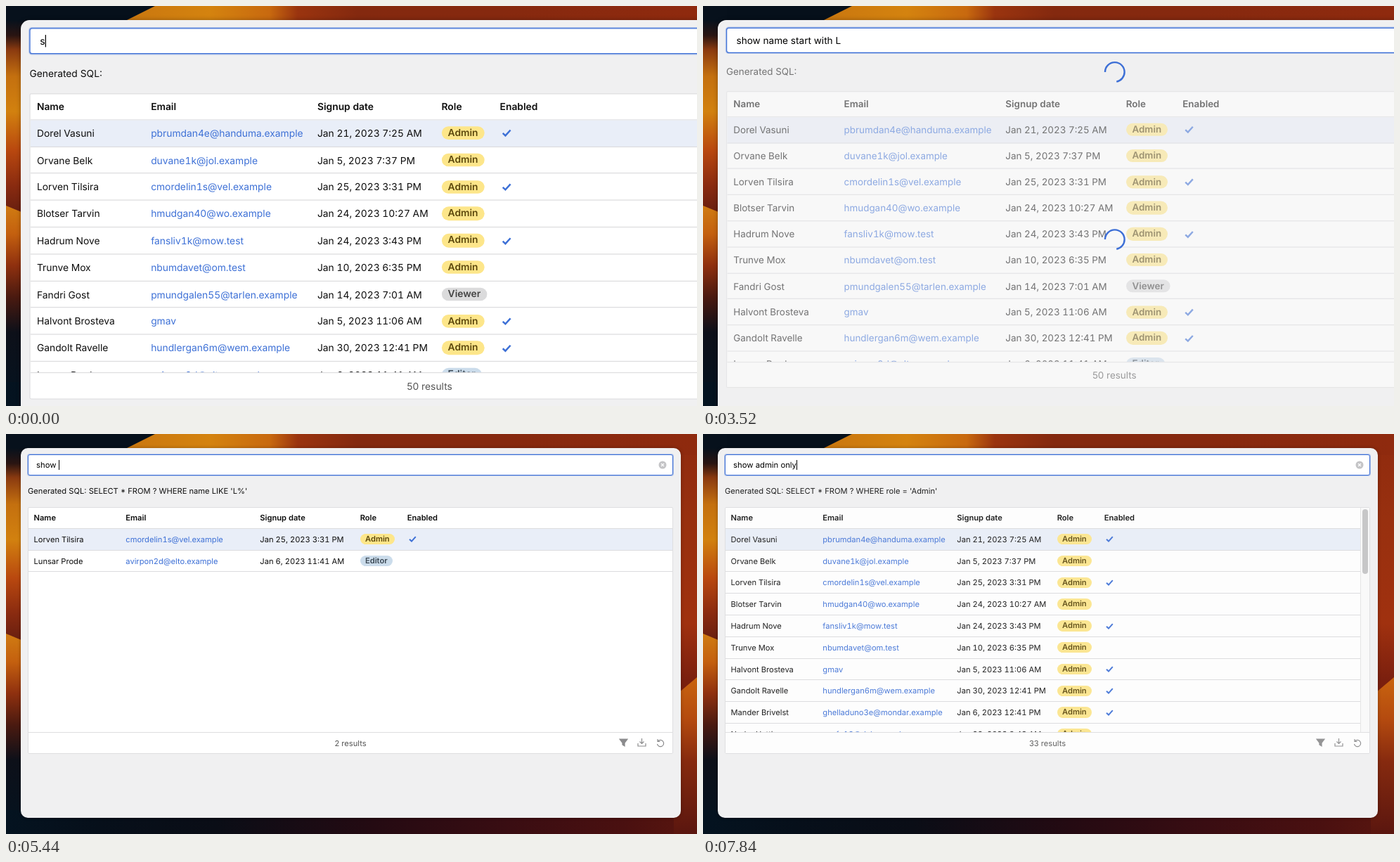
Recreate the animation shown at these times as an HTML page. Size 983 px wide and 569 px high, loop 8 s.

```html
<!DOCTYPE html>
<html lang="en">
<head>
<meta charset="utf-8">
<title>Ask your table</title>
<style>
  html, body { margin: 0; width: 100%; height: 100%; overflow: hidden; background: #06101b; }
  body { position: relative; font: 11.15px Inter, "Open Sans", sans-serif; color: #0e0e0e;
    text-rendering: geometricPrecision; }
  div, svg { position: absolute; }
  svg { overflow: visible; fill: none; }

  .left { left: 0; top: 0; width: 34px; height: 569px;
    background: linear-gradient(#07111c 20px, #2a1512 42px, #8a3a10 62px, #c4700f 100px,
      #d2810f 150px, #b9480f 205px, #8a2b10 255px, #6b2010 290px); }
  .left-low { left: 0; top: 284px; width: 34px; height: 285px;
    clip-path: polygon(0 0, 100% 14px, 100% 100%, 0 100%);
    background: linear-gradient(#d07c12, #c4600f 40px, #8f300f 85px, #4a1a10 130px, #0d1019 180px, #041320); }
  .bottom { left: 0; top: 535px; width: 983px; height: 34px;
    background: linear-gradient(90deg, #041320, #060f1a 130px, #0a0d16 300px, #240a12 520px,
      #3a0d12 720px, #4a1010 880px, #5a160f); }
  .right { left: 950px; top: 0; width: 33px; height: 569px;
    background: linear-gradient(#8f2a0e, #98300f 120px, #a0310f 270px, #7a1f0e 350px); }
  .right-low { left: 950px; top: 346px; width: 33px; height: 223px;
    clip-path: polygon(100% 0, 0 28px, 0 100%, 100% 100%);
    background: linear-gradient(#c9640f, #b44a0f 60px, #862a0f 120px, #5a160f); }
  .top { left: 0; top: 0; width: 983px; height: 30px;
    clip-path: polygon(152px 100%, 212px 0, 100% 0, 100% 100%);
    background: linear-gradient(90deg, #c9760f 165px, #d4830f 290px, #c8690f 375px, #9a340f 415px,
      #84290f 500px, #86290f 700px, #8f2a0e); }

  .panel { left: 21px; top: 20px; width: 939px; height: 526px; border-radius: 10px;
    background: #f0f0f1; box-shadow: 0 0 5px rgba(0, 0, 0, .3); transform-origin: 0 0; }
  .input { left: 10px; top: 9px; width: 916px; height: 28px; border: 1px solid #3d6fd6; border-radius: 3px;
    background: #fff; box-shadow: 0 0 0 1px rgba(61, 111, 214, .35); }
  .query { left: 11px; font-size: 11.3px; line-height: 28px; white-space: pre; color: #000; }
  .caret { display: inline-block; width: 1px; height: 14px; margin-right: -1px; vertical-align: -3px; background: #000; }
  .faded { left: 0; top: 0; width: 100%; height: 100%; }
  .sql { left: 10px; top: 52px; line-height: 19px; white-space: pre; }
  .table { left: 10px; top: 84px; width: 916px; height: 349px; border: 1px solid #dedee0;
    border-radius: 2px; background: #fff; overflow: hidden; }
  .rows { left: 0; top: 0; width: 100%; height: 318.5px; overflow: hidden; }
  .row { left: 0; width: 100%; height: 30.8px; line-height: 30.3px; white-space: pre;
    box-sizing: border-box; border-bottom: .9px solid #dcdcde; font-variant-numeric: tabular-nums; }
  .head { font-weight: 600; }
  .picked { background: #e9eef8; }
  .link { color: #3d70d6; }
  .pill { top: 7.2px; height: 15.4px; line-height: 15.4px; padding: 0 7px; border-radius: 8px; font-weight: 600; }
  .Admin { background: #fde68a; color: #5c480c; }
  .Viewer { background: #dbdbdc; color: #444; }
  .Editor { background: #cbdceb; color: #3b4854; }
  .track { right: 0; top: 0; width: 12.5px; height: 318.5px; background: #fafafa; border-left: 1px solid #e4e4e4; }
  .thumb { left: 2.5px; top: 2px; width: 8px; border-radius: 4px; background: #c3c3c5; }
  .foot { left: 0; top: 318.5px; width: 100%; height: 31px; line-height: 30px; text-align: center;
    border-top: 1px solid #dedee0; background: #fff; color: #555; box-sizing: border-box; }
</style>
</head>
<body>
<div class="left"></div><div class="left-low"></div>
<div class="bottom"></div>
<div class="right"></div><div class="right-low"></div>
<div class="top"></div>

<div class="panel" id="panel">
  <div class="faded" id="faded">
    <div class="sql" id="sql"></div>
    <div class="table">
      <div class="rows" id="rows"></div>
      <div class="track" id="track"><div class="thumb" id="thumb"></div></div>
      <div class="foot" id="foot"></div>
      <svg style="left:840px;top:327px" width="66" height="14" stroke="#8b8b8d" stroke-width="1.2">
        <path d="M1 2H12L8 7.5V12L5 10V7.5Z" fill="#8b8b8d"/>
        <path d="M32.5 1V8M29.5 5.5L32.5 8.5L35.5 5.5M27 8V12H38V8"/>
        <path d="M55 2V5.5H58.5M55.3 5.3A4.6 4.6 0 1 1 54.5 9"/>
      </svg>
    </div>
  </div>
  <div class="input">
    <div class="query"><span id="query"></span><span class="caret" id="caret"></span></div>
    <svg style="left:896px;top:8px" width="12" height="12">
      <circle cx="6" cy="6" r="5.5" fill="#c4c4c6"/>
      <path d="M4 4L8 8M8 4L4 8" stroke="#fff" stroke-width="1.2"/>
    </svg>
  </div>
  <svg id="spinners" width="939" height="526" stroke="#3d6fd6" stroke-width="2">
    <circle cx="469.5" cy="61.5" r="11.5" pathLength="100" stroke-dasharray="72 28"/>
    <circle cx="469.5" cy="259.5" r="11.5" pathLength="100" stroke-dasharray="72 28"/>
  </svg>
</div>

<script>
const LOOP = 8000, ROW = 30.8, ZOOM = 1.24, DIM = 0.55, FADE = 300;
const ui = Object.fromEntries([...document.querySelectorAll('[id]')].map(el => [el.id, el]));

// name, email, signup date, role, enabled
const people = [
  ['Dorel Vasuni', 'pbrumdan4e@handuma.example', 'Jan 21, 2023 7:25 AM', 'Admin', 1],
  ['Orvane Belk', 'duvane1k@jol.example', 'Jan 5, 2023 7:37 PM', 'Admin', 0],
  ['Lorven Tilsira', 'cmordelin1s@vel.example', 'Jan 25, 2023 3:31 PM', 'Admin', 1],
  ['Blotser Tarvin', 'hmudgan40@wo.example', 'Jan 24, 2023 10:27 AM', 'Admin', 0],
  ['Hadrum Nove', 'fansliv1k@mow.test', 'Jan 24, 2023 3:43 PM', 'Admin', 1],
  ['Trunve Mox', 'nbumdavet@om.test', 'Jan 10, 2023 6:35 PM', 'Admin', 0],
  ['Fandri Gost', 'pmundgalen55@tarlen.example', 'Jan 14, 2023 7:01 AM', 'Viewer', 0],
  ['Halvont Brosteva', 'gmav', 'Jan 5, 2023 11:06 AM', 'Admin', 1],
  ['Gandolt Ravelle', 'hundlergan6m@wem.example', 'Jan 30, 2023 12:41 PM', 'Admin', 1],
  ['Lunsar Prode', 'avirpon2d@elto.example', 'Jan 6, 2023 11:41 AM', 'Editor', 0],
  ['Mander Brivelst', 'ghelladuno3e@mondar.example', 'Jan 6, 2023 12:41 PM', 'Admin', 1],
  ['Nudro Hattin', 'vanfo12@dal.example', 'Jan 22, 2023 9:43 AM', 'Admin', 0],
];

const views = [
  { at: 0, sql: '', count: 50, thumb: 60, match: () => true },
  { at: 4400, sql: "SELECT * FROM ? WHERE name LIKE 'L%'", count: 2, thumb: 0, match: p => p[0][0] === 'L' },
  { at: 7600, sql: "SELECT * FROM ? WHERE role = 'Admin'", count: 33, thumb: 92, match: p => p[3] === 'Admin' },
];
const prompts = [
  { at: 0, typed: 0, pace: 125, text: 'show name start with L' },
  { at: 4760, typed: 4900, pace: 132, text: 'show admin only' },
];
const loads = [
  { from: 3140, to: 4400, turn: -34 },
  { from: 6800, to: 7600, turn: 45 },
];

const clamp = v => Math.min(1, Math.max(0, v));
const easeInOut = p => p < 0.5 ? 4 * p ** 3 : 1 - 4 * (1 - p) ** 3;
const latest = (list, t) => list.filter(item => item.at <= t).pop();
const cell = (x, text, cls = '') => `<div class="${cls}" style="left:${x}px">${text}</div>`;
const row = (i, cls, cells) => `<div class="row ${cls}" style="top:${(i * ROW - 1).toFixed(1)}px">${cells}</div>`;

const check = '<svg style="left:541px;top:10.5px" width="11" height="9" stroke="#3d70d6" stroke-width="2">' +
  '<path d="M1 4.8L4 7.6L9.8 1.2"/></svg>';
const header = row(0, 'head', cell(7.5, 'Name') + cell(138.3, 'Email') + cell(329.3, 'Signup date') +
  cell(471.7, 'Role') + cell(538.7, 'Enabled'));

function personRow([name, email, date, role, enabled], i) {
  return row(i + 1, i ? '' : 'picked', cell(7.5, name) + cell(138.3, email, 'link') +
    cell(329.3, date) + cell(472, role, 'pill ' + role) + (enabled ? check : ''));
}

let shown;
function showView(view) {
  if (view === shown) return;
  shown = view;
  ui.rows.innerHTML = header + people.filter(view.match).slice(0, 10).map(personRow).join('');
  ui.sql.textContent = 'Generated SQL: ' + view.sql;
  ui.foot.textContent = view.count + ' results';
  ui.track.style.display = view.thumb ? '' : 'none';
  ui.thumb.style.height = view.thumb + 'px';
}

function showPrompt(t) {
  const { typed, pace, text } = latest(prompts, t);
  const length = Math.min(text.length, Math.max(0, Math.floor((t - typed) / pace) + 1));
  const idle = t - typed - (text.length - 1) * pace;
  ui.query.textContent = text.slice(0, length);
  ui.caret.style.visibility = idle > 0 && idle % 1000 >= 500 ? 'hidden' : 'visible';
}

function showLoading(t) {
  let dim = 0, spin = 0;
  for (const { from, to, turn } of loads) {
    dim += clamp((t - from) / FADE) - clamp((t - to) / FADE);
    if (t < from || t >= to) continue;
    spin = clamp((t - from) / FADE);
    for (const ring of ui.spinners.children) {
      const angle = turn + (t - from) * 0.5625;
      ring.setAttribute('transform', `rotate(${angle} ${ring.getAttribute('cx')} ${ring.getAttribute('cy')})`);
    }
  }
  ui.faded.style.opacity = 1 - (1 - DIM) * dim;
  ui.spinners.style.opacity = spin;
}

function frame() {
  const t = performance.now() % LOOP;
  const zoomOut = easeInOut(clamp((t - 3200) / 950));
  ui.panel.style.transform = `scale(${ZOOM + (1 - ZOOM) * zoomOut})`;
  showView(latest(views, t));
  showPrompt(t);
  showLoading(t);
  requestAnimationFrame(frame);
}
frame();
</script>
</body>
</html>
```
